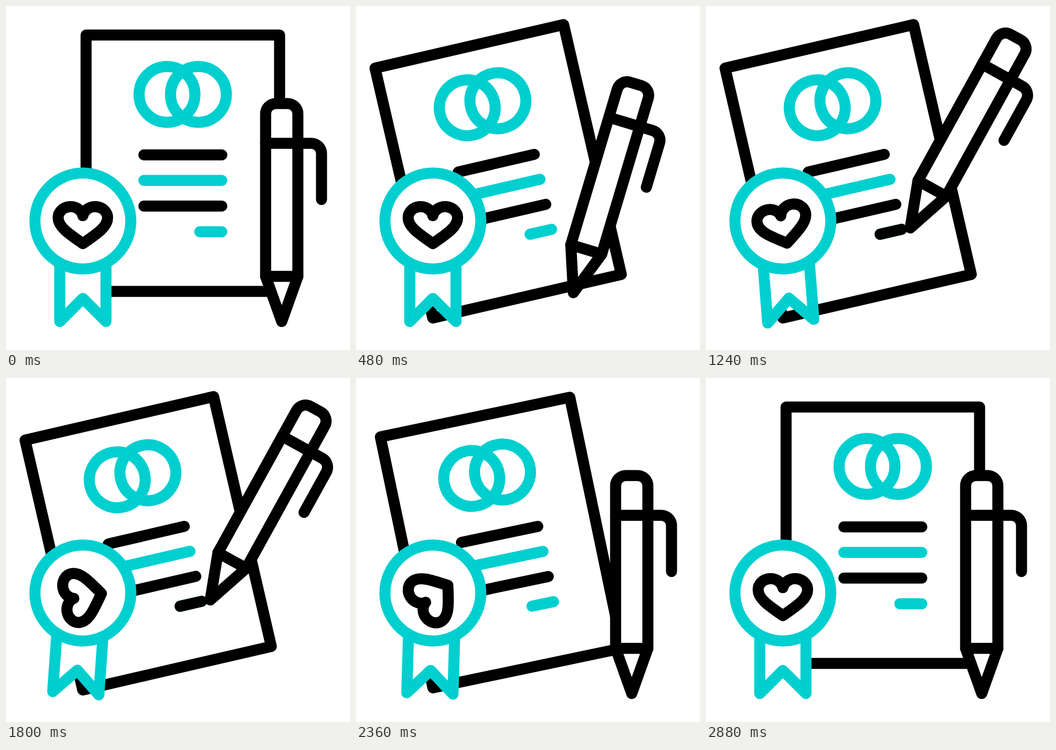
These frames come from a looping animation (640x640 px, 3200 ms). An HTML page:

```html
<!DOCTYPE html>
<html lang="en">
<head>
<meta charset="utf-8">
<title>Signing a certificate</title>
<style>
  html, body { margin: 0; width: 100%; height: 100%; overflow: hidden; background: #fff; }
  svg { display: block; width: 100vw; height: 100vh; }
  .ink, .teal { fill: none; stroke: #000; stroke-width: 20.6; stroke-linecap: round; stroke-linejoin: round; }
  .teal { stroke: #00cfcf; }
  .solid { fill: #fff; }
</style>
</head>
<body>
<svg viewBox="0 0 640 640">
  <g id="paper">
    <rect class="ink solid" x="149" y="54" width="360" height="477"/>
    <circle class="teal" cx="299.5" cy="164.5" r="52"/>
    <circle class="teal" cx="358" cy="164.5" r="52"/>
    <path class="ink" d="M256.5 277H401.5M256.5 372.3H401.5"/>
    <path class="teal" d="M256.5 324.5H401.5M360.5 420H401.5"/>
    <path class="ink" id="sign"/>
  </g>
  <g id="medal">
    <path class="teal solid" d="M100 480V587L143 544L186 587V480"/>
    <circle class="teal solid" cx="143" cy="400" r="89.2"/>
  </g>
  <path class="ink" id="heart" d="M143 390A23.2 20.5 0 0 0 97 394C97 410 114 422 143 442C172 422 189 410 189 394A23.2 20.5 0 0 0 143 390Z"/>
  <g id="pen">
    <path class="ink solid" d="M483 503V200.5A19 19 0 0 1 502 181.5H524A19 19 0 0 1 543 200.5V503L513 587Z"/>
    <path class="ink" d="M483 503H543M483 255.5H568A19 19 0 0 1 587 274.5V360"/>
  </g>
</svg>
<script>
const LOOP = 3200;
const $ = id => document.getElementById(id);
const paper = $('paper'), sign = $('sign'), medal = $('medal'), heart = $('heart'), pen = $('pen');

const linear = u => u;
const smooth = u => (1 - Math.cos(Math.PI * u)) / 2;

// Value at time t from [time, value] keys
function track(keys, t, ease = smooth) {
  if (t <= keys[0][0]) return keys[0][1];
  for (let i = 1; i < keys.length; i++) {
    const [t0, a] = keys[i - 1], [t1, b] = keys[i];
    if (t < t1) return a + (b - a) * ease((t - t0) / (t1 - t0));
  }
  return keys[keys.length - 1][1];
}

const curve = (a, b, c, p) => a.map((v, i) =>
  v * (1 - p) ** 2 + 2 * b[i] * p * (1 - p) + c[i] * p * p);

const TILT = [[0, 0], [440, 1], [2275, 1], [2715, 0]];
const REACH = [[240, 0], [680, 1], [1840, 1], [2320, 0]];
const WRITE = [[920, 0], [1200, 1]];
const LINE = [[920, 0], [1200, 1], [1840, 1], [2080, 0]];
const SWING = [[960, 0], [1480, -8], [1840, 4.4], [2040, 4.4], [2600, 0]];
const SPIN = [[1000, 0], [2200, -133], [2280, -133], [2880, 0]];

// Pen tip positions
const REST = [513, 587], START = [324, 425], END = [380, 413];

function penTip(t, p) {
  if (t < 920) return curve(REST, [418.5, 587], START, p);
  if (t > 1840) return curve(REST, [400, 587], END, p);
  const w = track(WRITE, t, linear);
  return START.map((v, i) => v + (END[i] - v) * w);
}

const set = (el, value) => el.setAttribute('transform', value);

function draw(t) {
  const tilt = track(TILT, t);
  set(paper, `translate(${-64.5 * tilt} ${15 * tilt}) rotate(${-13 * tilt} 329 292.5)`);

  const line = track(LINE, t, linear);
  sign.setAttribute('d', line > 0 ? `M360.5 420h${41 * line}` : '');

  set(medal, `rotate(${track(SWING, t)} 143 400)`);
  set(heart, `rotate(${track(SPIN, t)} 143 407)`);

  const reach = track(REACH, t);
  const [x, y] = penTip(t, reach);
  set(pen, `translate(${x} ${y}) rotate(${28.9 * reach}) translate(-513 -587)`);
}

const began = performance.now();
function tick() {
  draw((performance.now() - began) % LOOP);
  requestAnimationFrame(tick);
}
tick();
</script>
</body>
</html>
```
